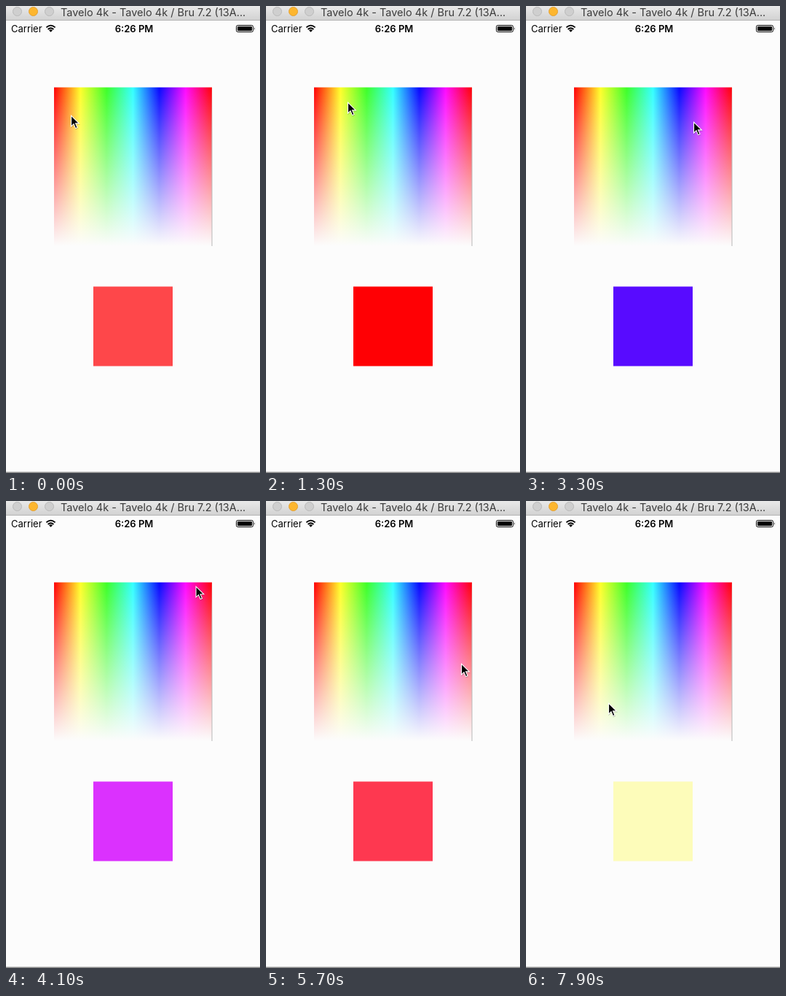
Recreate the animation shown at these times as an HTML page. Size 349x640 px, loop 8 s.

```html
<!DOCTYPE html>
<html lang="en">
<head>
<meta charset="utf-8">
<title>Colour picker</title>
<style>
  html, body { margin: 0; width: 100%; height: 100%; overflow: hidden; background: #fcfcfc; }
  svg { display: block; width: 100vw; height: 100vh; }
  text { font-family: Inter, Roboto, sans-serif; }
</style>
</head>
<body>
<svg viewBox="0 0 349 640">
  <defs>
    <linearGradient id="bar" x2="0" y2="1">
      <stop stop-color="#e9e9e9"/><stop offset="1" stop-color="#d1d1d1"/>
    </linearGradient>
    <linearGradient id="hues"></linearGradient>
    <linearGradient id="fade" x2="0" y2="1">
      <stop stop-color="#fcfcfc" stop-opacity="0"/><stop offset="1" stop-color="#fcfcfc"/>
    </linearGradient>
    <linearGradient id="edge" x2="0" y2="1">
      <stop stop-color="#b8b8b8" stop-opacity=".2"/><stop offset=".3" stop-color="#b8b8b8"/>
    </linearGradient>
  </defs>
  <rect width="349" height="640" fill="#fcfcfc"/>

  <rect width="349" height="20" fill="url(#bar)"/>
  <rect y="19" width="349" height="1" fill="#b5b5b5"/>
  <g fill="#cfcfcf" stroke="#b9b9b9">
    <circle cx="15.5" cy="7.5" r="6"/>
    <circle cx="37.5" cy="7.5" r="6" fill="#fdb62f" stroke="#e2a136"/>
    <circle cx="59.5" cy="7.5" r="6"/>
  </g>
  <text x="75" y="13.5" font-size="14.5" fill="#3c3c3c">Tavelo 4k - Tavelo 4k / Bru 7.2 (13A...</text>

  <text x="7" y="36" font-size="13">Carrier</text>
  <g fill="none" stroke="#000" stroke-width="1.8">
    <path d="M55.4 29.4Q61.5 23.8 67.6 29.4"/>
    <path d="M57.6 32Q61.5 28.4 65.4 32"/>
    <path d="M59 33.3Q61.5 31.2 64 33.3L61.5 35.8Z" fill="#000" stroke="none"/>
  </g>
  <text x="176" y="36" font-size="13" font-weight="600" text-anchor="middle">6:26 PM</text>
  <rect x="316.5" y="26.5" width="23" height="9" rx="2" fill="none" stroke="#000"/>
  <rect x="318" y="28" width="20" height="6" rx=".8"/>
  <path d="M341 29q1.6 2 0 4z"/>

  <rect x="66" y="111.5" width="217" height="217" fill="url(#hues)"/>
  <rect x="66" y="111" width="217" height="218" fill="url(#fade)"/>
  <rect x="282.5" y="112" width="1" height="217" fill="url(#edge)"/>
  <rect id="swatch" x="120" y="384.5" width="109" height="109"/>
  <rect y="638.5" width="349" height="1.5" fill="#8a8a8a"/>

  <g id="cursor">
    <path d="M0 0V17.2L3.9 13.6L6.4 19.3L9.7 17.9L7.3 12.4H12.6Z" transform="translate(.4 1)" fill="#000" opacity=".2"/>
    <path d="M0 0V17.2L3.9 13.6L6.4 19.3L9.7 17.9L7.3 12.4H12.6Z" fill="#fff"/>
    <path d="M1.1 2.6V14.8L4.2 11.8L6.9 17.9L8.3 17.3L5.7 11.3H10Z"/>
  </g>
</svg>
<script>
const LOOP = 8000, STEP = 100, LAG = 500;
const FIELD = { x: 66, y: 111, size: 217 };
const HUES = [[255, 0, 4], [255, 254, 40], [60, 255, 40], [50, 255, 255], [8, 8, 255], [255, 8, 255], [255, 0, 4]];
const WHITE = 252;

// time, x, y of the pointer tip
const PATH = [
  [-500, 66, 172], [0, 89, 149], [800, 66, 111], [1300, 112, 131], [2800, 222, 114],
  [3300, 230, 158], [4300, 267, 111], [4800, 272, 132], [5200, 279, 159], [5700, 268, 222],
  [6400, 245, 250], [6900, 184, 262], [7400, 102, 260], [7900, 113, 276]
];

const clamp = (v, lo, hi) => Math.min(hi, Math.max(lo, v));
const mix = (a, b, k) => a + (b - a) * k;

function slope(i, axis) {
  const a = PATH[Math.max(0, i - 1)], b = PATH[Math.min(PATH.length - 1, i + 1)], p = PATH[i];
  const turning = (p[axis] - a[axis]) * (b[axis] - p[axis]) <= 0;
  return turning ? 0 : (b[axis] - a[axis]) / (b[0] - a[0]);
}

function pointer(t) {
  let i = 0;
  while (i < PATH.length - 2 && t >= PATH[i + 1][0]) i++;
  const a = PATH[i], b = PATH[i + 1], span = b[0] - a[0], u = clamp((t - a[0]) / span, 0, 1);
  return [1, 2].map(axis =>
    mix(a[axis], b[axis], u * u * (3 - 2 * u)) +
    span * u * (1 - u) * ((1 - u) * slope(i, axis) - u * slope(i + 1, axis)));
}

function colourAt([x, y]) {
  const h = clamp((x - FIELD.x) / FIELD.size, 0, 1) * 6;
  const i = Math.min(5, Math.floor(h));
  const pale = clamp((y - FIELD.y) / FIELD.size, 0, 1);
  const rgb = HUES[i].map((c, n) => Math.round(mix(mix(c, HUES[i + 1][n], h - i), WHITE, pale)));
  return `rgb(${rgb})`;
}

document.getElementById("hues").innerHTML =
  HUES.map((c, i) => `<stop offset="${i / 6}" stop-color="rgb(${c})"/>`).join("");
const cursor = document.getElementById("cursor");
const swatch = document.getElementById("swatch");

function draw(time) {
  const t = Math.floor((time % LOOP) / STEP) * STEP;
  const [x, y] = pointer(t);
  cursor.setAttribute("transform", `translate(${x.toFixed(1)} ${y.toFixed(1)})`);
  swatch.setAttribute("fill", colourAt(pointer(t - LAG)));
}

const start = performance.now();
function tick() {
  draw(performance.now() - start);
  requestAnimationFrame(tick);
}
tick();
</script>
</body>
</html>
```
